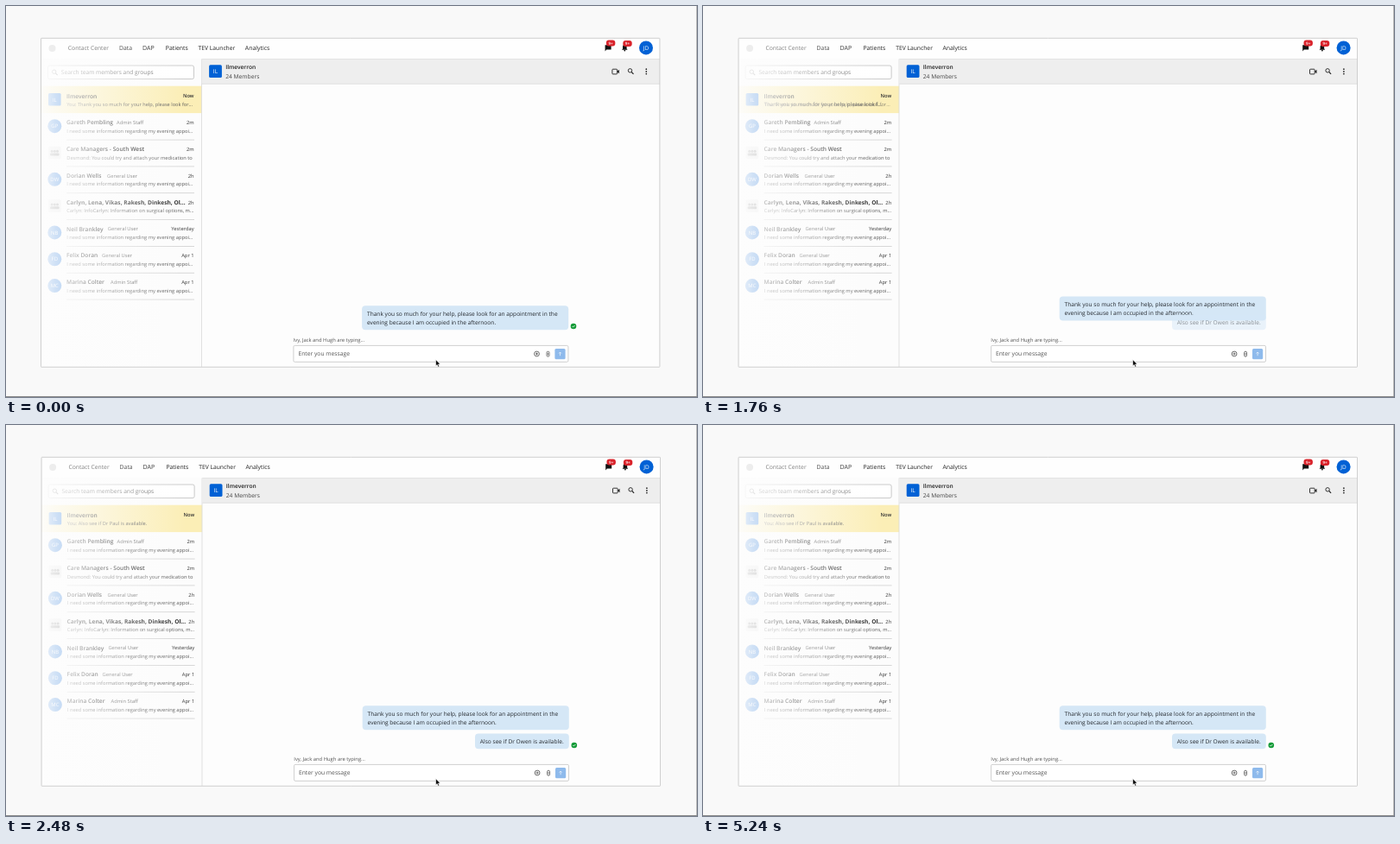
An HTML page with a canvas that plays this animation: 800 px wide and 453 px high, repeating every 5300 ms.

```html
<!DOCTYPE html>
<html lang="en">
<head>
<meta charset="utf-8">
<title>Team chat</title>
<style>
html, body { margin: 0; width: 100%; height: 100%; overflow: hidden; background: #f9f9f9; }
canvas { display: block; width: 800px; height: 453px; }
</style>
</head>
<body>
<canvas id="stage"></canvas>
<script>
const LOOP = 5300;
const FONT = '"Open Sans", "Noto Sans", sans-serif';
const BLUE = '#0061d5', INK = '#212121', ROW = 30.83;

const canvas = document.getElementById('stage');
const ctx = canvas.getContext('2d');
const dpr = window.devicePixelRatio || 1;
canvas.width = 800 * dpr;
canvas.height = 453 * dpr;

const rows = [
  { name: 'Ilmeverron', time: 'Now', mark: 'IL', box: true },
  { name: 'Gareth Pembling', tag: 'Admin Staff', tagX: 128, time: '2m', mark: 'GP' },
  { name: 'Care Managers - South West', time: '2m', group: true,
    note: 'Desmond: You could try and attach your medication to' },
  { name: 'Dorian Wells', tag: 'General User', tagX: 117, time: '2h', mark: 'DW' },
  { name: 'Carlyn, Lena, Vikas, Rakesh, Dinkesh, Ol...', time: '2h', group: true, unread: true,
    note: 'Carlyn: InfoCarlyn: Information on surgical options, m...' },
  { name: 'Neil Brankley', tag: 'General User', tagX: 117.8, time: 'Yesterday', mark: 'NB' },
  { name: 'Felix Doran', tag: 'General User', tagX: 111, time: 'Apr 1', mark: 'FD' },
  { name: 'Marina Colter', tag: 'Admin Staff', tagX: 121, time: 'Apr 1', mark: 'MC' }
];
const COMMON_NOTE = 'I need some information regarding my evening appoi...';

const clamp = v => Math.min(1, Math.max(0, v));
const ramp = (t, from, to) => clamp((t - from) / (to - from));
const easeOut = p => 1 - Math.pow(1 - p, 3);
const easeInOut = p => p * p * (3 - 2 * p);

// Text is set ten times larger and scaled down to keep fractional advances.
function text(str, x, y, size, color = INK, weight = 400, align = 'left') {
  ctx.save();
  ctx.translate(x, y);
  ctx.scale(0.1, 0.1);
  ctx.font = `${weight} ${size * 10}px ${FONT}`;
  ctx.textRendering = 'geometricPrecision';
  ctx.textAlign = align;
  ctx.fillStyle = color;
  ctx.fillText(str, 0, 0);
  ctx.restore();
}

function rect(x, y, w, h, color) {
  ctx.fillStyle = color;
  ctx.fillRect(x, y, w, h);
}

function round(x, y, w, h, r, fill, stroke, width = 0.8) {
  ctx.beginPath();
  ctx.roundRect(x, y, w, h, r);
  paint(fill, stroke, width);
}

function disc(x, y, r, fill, stroke, width = 0.8) {
  ctx.beginPath();
  ctx.arc(x, y, r, 0, Math.PI * 2);
  paint(fill, stroke, width);
}

function path(points, fill, stroke, width = 0.8) {
  ctx.beginPath();
  points.forEach(([x, y], i) => i ? ctx.lineTo(x, y) : ctx.moveTo(x, y));
  if (fill) ctx.closePath();
  paint(fill, stroke, width);
}

function paint(fill, stroke, width) {
  if (fill) { ctx.fillStyle = fill; ctx.fill(); }
  if (stroke) { ctx.strokeStyle = stroke; ctx.lineWidth = width; ctx.stroke(); }
}

function fade(alpha, draw) {
  if (alpha <= 0) return;
  ctx.save();
  ctx.globalAlpha *= alpha;
  draw();
  ctx.restore();
}

function magnifier(x, y, color) {
  disc(x - 0.8, y - 0.8, 2.2, null, color, 0.9);
  path([[x + 0.9, y + 0.9], [x + 3.2, y + 3.2]], null, color, 1.1);
}

function badge(x, y) {
  round(x, y, 10.4, 7, 3, '#d9232b');
  text('9+', x + 5.2, y + 5.1, 4.6, '#fff', 600, 'center');
}

function nav() {
  rect(40.5, 37.5, 716.5, 24, '#fefefe');
  disc(53.5, 49, 4, '#ededed');
  const soft = ctx.createLinearGradient(72, 0, 172, 0);
  soft.addColorStop(0, '#9b9b9b');
  soft.addColorStop(0.45, '#757575');
  soft.addColorStop(1, '#303030');
  text('Contact Center', 71.8, 51, 6.78, '#828282');
  ctx.save();
  text('Data', 131, 51, 6.85, '#4c4c4c');
  text('DAP', 158, 51, 7, '#363636');
  ctx.restore();
  text('Patients', 184.8, 51, 6.88, INK, 500);
  text('TEV Launcher', 222.6, 51, 6.75, INK, 500);
  text('Analytics', 276.8, 51, 6.9, INK, 500);

  path([[693.6, 45.2], [700.6, 45.2], [700.6, 50.6], [695.2, 50.6], [693.6, 52.4]], '#111');
  badge(694.9, 39.4);
  ctx.beginPath();
  ctx.moveTo(713, 50.8);
  ctx.lineTo(714, 49.5);
  ctx.lineTo(714, 47.3);
  ctx.bezierCurveTo(714, 44, 718.6, 44, 718.6, 47.3);
  ctx.lineTo(718.6, 49.5);
  ctx.lineTo(719.6, 50.8);
  ctx.closePath();
  paint('#111');
  disc(716.3, 51.6, 0.9, '#111');
  badge(714.3, 40);
  disc(741, 48.4, 8, BLUE);
  text('JD', 741, 50.8, 6.5, '#fff', 400, 'center');
}

function people(x, y) {
  for (const dx of [-3.2, 3.2, 0]) {
    disc(x + dx, y - 1.6, 1.5, '#777');
    round(x + dx - 2, y + 0.6, 4, 3, 1, '#777');
  }
}

function firstNote(t, y) {
  const gray = '#555';
  fade(1 - ramp(t, 1690, 1900), () =>
    text('You: Thank you so much for your help, please look for...', 70.2, y, 5.65, gray));
  fade(ramp(t, 1690, 1760) * (1 - ramp(t, 1980, 2210)), () =>
    text('Thank you so much for your help, please look f...', 70.2, y, 6.05, '#4a4a4a'));
  fade(ramp(t, 1860, 2210), () =>
    text('You: Also see if Dr Paul is available.', 70.2, y, 5.7, gray));
}

function sidebar(t) {
  rect(40.5, 61.5, 186, 356.5, '#fcfcfc');
  round(48.5, 69, 169, 15.6, 2, '#fff', '#bdbdbd');
  magnifier(56.5, 77, '#777');
  text('Search team members and groups', 63.8, 79.3, 6.64, '#666');

  rect(40.5, 92.7, 186, 31.4, '#fbeeb6');
  rows.forEach((row, i) => {
    const y = i * ROW, cy = 108.3 + y;
    if (row.group) {
      round(49, cy - 7.3, 14.6, 14.6, 1.5, '#e4e4e4');
      people(56.3, cy);
    } else {
      if (row.box) round(49, cy - 7.3, 14.6, 14.6, 1.5, BLUE);
      else disc(56.3, cy, 8, BLUE);
      text(row.mark, 56.3, cy + 2.2, 6, '#fff', 400, 'center');
    }
    text(row.name, 70, 106.5 + y, 6.65, INK, row.unread ? 700 : 600);
    if (row.tag) text(row.tag, row.tagX, 106.3 + y, 5.75, '#555');
    text(row.time, 217.6, 106.2 + y, 5.8, '#333', i ? 400 : 600, 'right');
    if (i) {
      text(row.note || COMMON_NOTE, 70.2, 116 + y, 5.73, '#555');
      rect(70, 123.9 + y, 148, 0.7, '#c8c8c8');
    } else {
      firstNote(t, 116);
    }
  });

  const veil = ctx.createLinearGradient(40.5, 0, 208, 0);
  veil.addColorStop(0, 'rgba(253,253,253,0.95)');
  veil.addColorStop(0.1, 'rgba(253,253,253,0.82)');
  veil.addColorStop(0.5, 'rgba(253,253,253,0.46)');
  veil.addColorStop(1, 'rgba(253,253,253,0)');
  rect(40.5, 61.5, 186, 356.5, veil);
  rect(226, 61.5, 0.8, 356.5, '#dadada');
}

function chatHeader() {
  rect(226.7, 61.3, 530.3, 29, '#eeeeee');
  rect(226.7, 61.1, 530.3, 0.7, '#dedede');
  rect(226.7, 89.8, 530.3, 0.7, '#d6d6d6');
  round(235.1, 68.3, 14.8, 14.8, 1.6, BLUE);
  text('IL', 242.5, 78.2, 6.6, '#fff', 400, 'center');
  text('Ilmeverron', 254.2, 73.1, 6.6, INK, 600);
  text('24 Members', 254.2, 83.9, 6.68, '#444');

  round(701.9, 73.2, 5.7, 5.7, 0.8, null, INK, 0.9);
  path([[707.8, 75.6], [709.9, 73.8], [709.9, 78.3], [707.8, 76.5]], INK);
  magnifier(723.3, 75.6, INK);
  for (const y of [73.2, 75.9, 78.6]) disc(741.3, y, 0.85, INK);
}

function tick(x, y) {
  disc(x, y, 3.3, '#149b38');
  path([[x - 1.5, y], [x - 0.4, y + 1.1], [x + 1.6, y - 1]], null, '#fff', 0.8);
}

function clock(x, y) {
  disc(x, y, 2.9, '#e4f4e7', '#3aa655', 0.8);
  path([[x, y - 1.6], [x, y + 0.2], [x + 1.2, y + 0.8]], null, '#3aa655', 0.7);
}

function messages(t) {
  const move = easeOut(ramp(t, 1700, 2000));
  const lift = -22 * move;
  round(412.1, 347.3 + lift, 239.1, 28, 4, '#d5e7f6');
  text('Thank you so much for your help, please look for an appointment in the',
    418, 358.5 + lift, 6.6, '#24282d');
  text('evening because I am occupied in the afternoon.', 418, 368.5 + lift, 6.6, '#24282d');

  fade(move, () => {
    round(542.4, 357.4, 108.8, 17.8, 4, '#d5e7f6');
    text('Also see if Dr Owen is available.', 548.2, 368.5, 6.6, '#24282d');
  });

  const done = ramp(t, 2270, 2480);
  fade(1 - ramp(t, 1290, 1500), () => tick(657, 371));
  fade(ramp(t, 1850, 1990) * (1 - done), () => clock(657.2, 371));
  fade(done, () => tick(657.2, 371));
}

function composer() {
  text('Ivy, Jack and Hugh are typing...', 332.7, 389, 5.85, '#505050');
  round(332.9, 393.4, 318, 19, 1.5, '#fff', '#c6c6c6');
  text('Enter you message', 338.4, 405.4, 6.73, '#555');

  const gray = '#4a4a4a';
  disc(614.5, 403, 2.9, null, gray, 0.8);
  path([[613, 403], [616, 403]], null, gray, 0.8);
  path([[614.5, 401.5], [614.5, 404.5]], null, gray, 0.8);
  round(626, 400.2, 3, 6, 1.5, null, gray, 0.75);
  path([[627.5, 401.8], [627.5, 404.6]], null, gray, 0.75);

  round(635.4, 397, 12.2, 12.2, 1.5, '#8ebaec');
  path([[641.5, 405.2], [641.5, 401]], null, '#e8f2fc', 0.8);
  path([[640, 402.5], [641.5, 401], [643, 402.5]], null, '#e8f2fc', 0.8);
}

function pointer() {
  path([[497.6, 409.8], [497.6, 417], [499.2, 415.6], [500.4, 418.2],
    [501.6, 417.6], [500.5, 415.2], [502.6, 415]], '#000', '#fff', 0.6);
}

function draw(t) {
  ctx.setTransform(dpr, 0, 0, dpr, 0, 0);
  rect(0, 0, 800, 453, '#f9f9f9');
  rect(799, 0, 1, 453, '#b8b8b8');
  rect(0, 452, 800, 1, '#8c8c8c');

  ctx.save();
  ctx.translate(0.6 * easeInOut(ramp(t, 1270, 1540)), 0);
  rect(40.5, 37.5, 716.5, 380.5, '#fdfdfd');
  nav();
  sidebar(t);
  chatHeader();
  messages(t);
  composer();
  round(40.5, 37.3, 716.4, 381, 0.5, null, '#cbcbcb', 0.9);
  ctx.restore();
  pointer();
}

const start = performance.now();
function frame(now) {
  draw(Math.max(0, now - start) % LOOP);
  requestAnimationFrame(frame);
}
draw(0);
requestAnimationFrame(frame);
</script>
</body>
</html>
```
